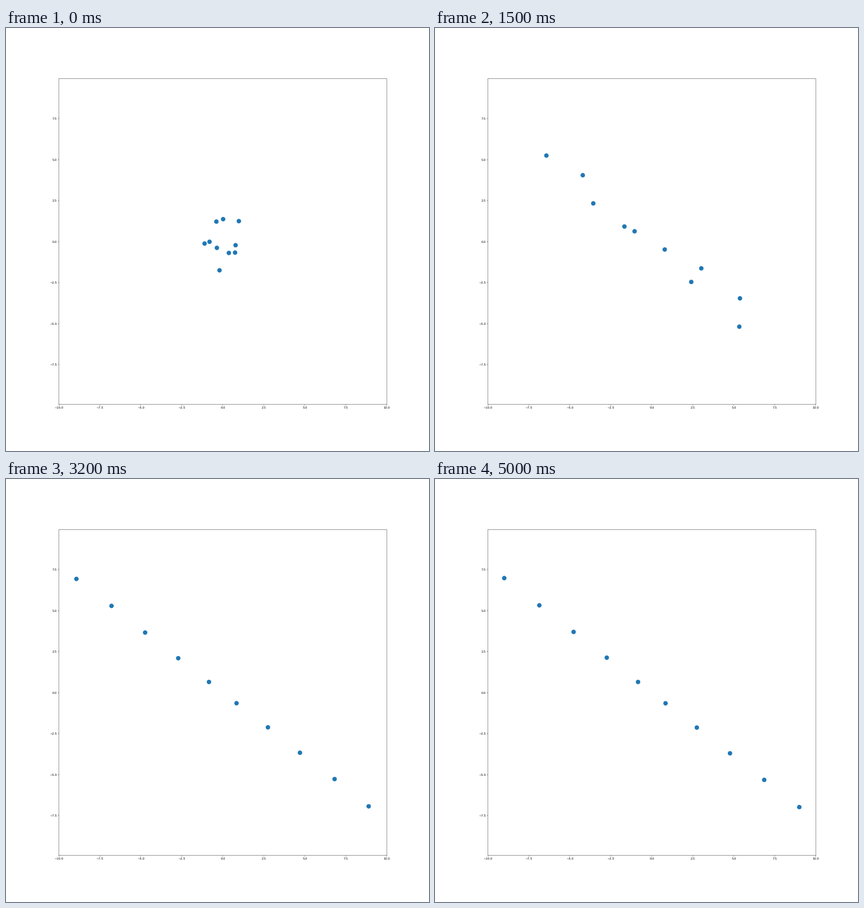
Write a matplotlib script that moves like this. It is 748 px wide and 748 px high and loops after 5550 ms.

```python
import numpy as np
import matplotlib.pyplot as plt
from matplotlib.animation import FuncAnimation

SIZE = 748          # px
STEP, LOOP = 50, 5550   # ms
OPEN, REST = 1.5, 5.0   # s: chain has unfolded, chain stands still
COUNT = 10
SLOPE = -0.776

plt.rcParams["font.family"] = "DejaVu Sans"
plt.rcParams["text.hinting"] = "none"

# Dots in chain order: the random knot at the start and the unfolded chain.
KNOT = np.array([(-0.39, 1.22), (0.02, 1.37), (0.98, 1.25), (-0.81, -0.01),
                 (-1.11, -0.12), (-0.36, -0.38), (0.37, -0.69),
                 (-0.20, -1.75), (0.78, -0.22), (0.75, -0.67)])
CHAIN = np.array([(-6.43, 5.25), (-4.21, 4.05), (-3.57, 2.33), (-1.67, 0.92),
                  (-1.05, 0.63), (0.79, -0.48), (3.02, -1.63),
                  (2.41, -2.46), (5.38, -3.46), (5.34, -5.19)])


def rest_line():
    """Sloping row of dots, spaced a little wider towards its ends."""
    s = np.linspace(-1, 1, COUNT)
    x = 9 * np.sign(s) * np.abs(s) ** 1.08
    return np.column_stack([x, SLOPE * x])


LINE = rest_line()


def pose(t):
    if t < OPEN:
        # The knot spreads sideways first, then up and down.
        u = t / OPEN
        ease = np.array([np.sin(np.pi * u / 2),
                         u ** 3 * (10 - 15 * u + 6 * u * u)])
        return KNOT + (CHAIN - KNOT) * ease
    # The chain stretches past the resting line and swings back onto it.
    u = min((t - OPEN) / (REST - OPEN), 1)
    return LINE + (CHAIN - LINE) * (1 - u) * (1 - 1.95 * u)


fig, ax = plt.subplots(figsize=(20, 20), dpi=SIZE / 20)
ax.set(xlim=(-10, 10), ylim=(-9.934, 9.934),
       xticks=np.arange(-10, 10.1, 2.5), yticks=np.arange(-7.5, 7.6, 2.5))
for spine in ax.spines.values():
    spine.set_snap(False)

# One size per dot keeps the dots from being rounded to whole pixels.
dots = ax.scatter(*KNOT.T, s=[200] * COUNT, color="C0")


def draw(n):
    dots.set_offsets(pose(n * STEP / 1000))
    return (dots,)


anim = FuncAnimation(fig, draw, frames=LOOP // STEP, interval=STEP,
                     repeat=True, repeat_delay=0)
plt.show()
```
